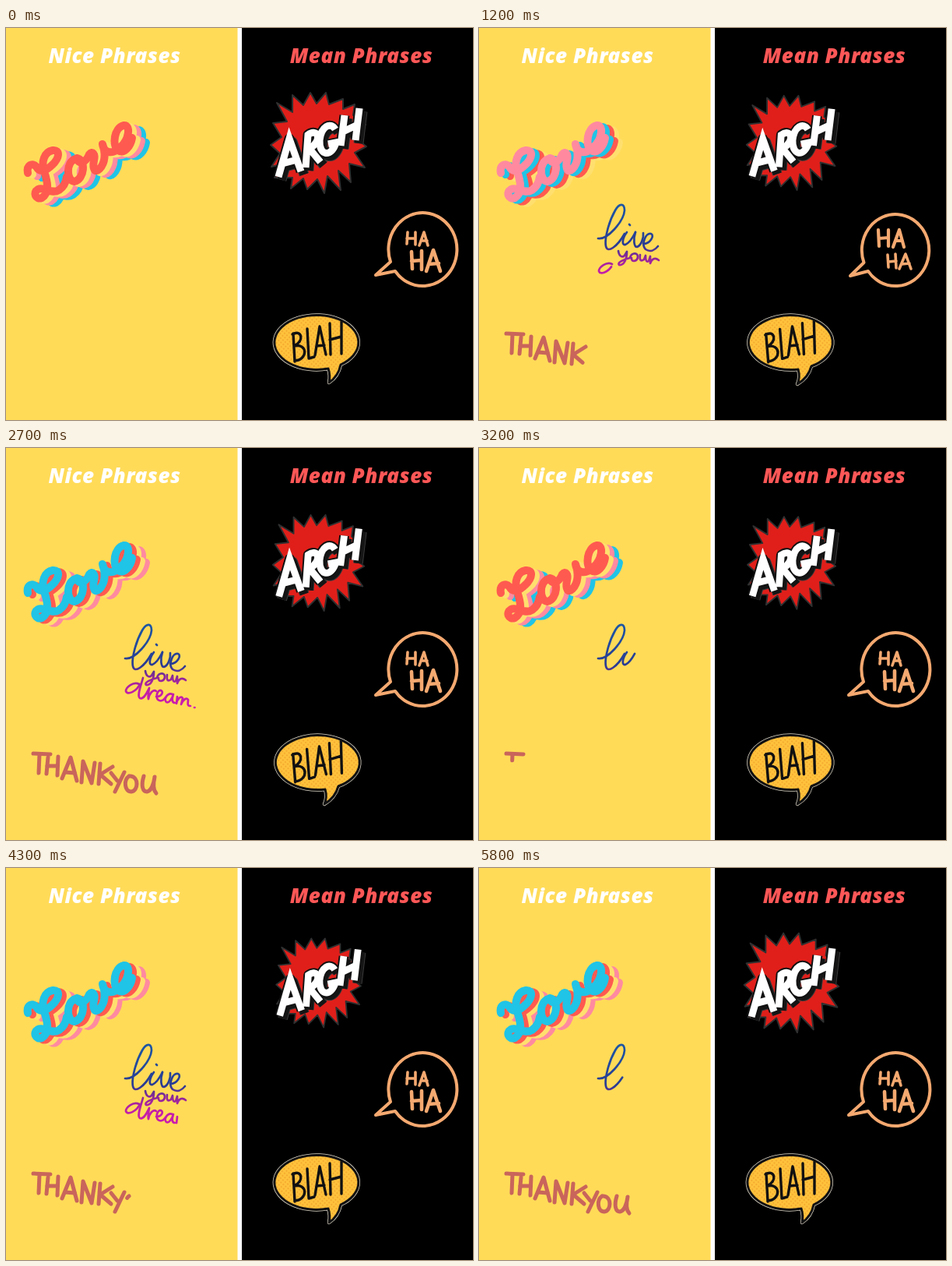
An HTML page for the animation above (5.9 s loop, 600 px wide and 503 px high).

```html
<!DOCTYPE html>
<html lang="en">
<head>
<meta charset="utf-8">
<title>Nice and mean phrases</title>
<style>
  html, body { margin: 0; height: 100%; overflow: hidden; background: #fff; }
  svg { display: block; width: 100vw; height: 100vh; }
  text { font: italic 800 26px "Open Sans", sans-serif; letter-spacing: .5px; text-anchor: middle; }
  .pen { fill: none; stroke-linecap: round; stroke-linejoin: round; }
</style>
</head>
<body>
<svg viewBox="0 0 600 503">
  <defs>
    <linearGradient id="ink" gradientUnits="userSpaceOnUse" x1="0" y1="225" x2="0" y2="334">
      <stop offset="0" stop-color="#1c57a5"/>
      <stop offset=".5" stop-color="#2a3b92"/>
      <stop offset=".63" stop-color="#8d2898"/>
      <stop offset=".78" stop-color="#c01fa6"/>
      <stop offset="1" stop-color="#cf1bb0"/>
    </linearGradient>
    <pattern id="dots" width="4" height="4" patternUnits="userSpaceOnUse" patternTransform="rotate(40)">
      <rect width="4" height="4" fill="#ffc23c"/>
      <circle cx="2" cy="2" r="1" fill="#f1a42b"/>
    </pattern>
    <g id="love">
      <path d="M28 186C26 176 34 172 39 178C44 187 53 182 59 176C69 167 70 156 60 157C49 159 45 172 49 184
        C53 196 57 211 46 218C38 221 34 211 41 207C50 203 58 214 68 208C74 204 77 198 78 191"/>
      <path d="M89 168C77 172 77 196 88 197C101 194 103 169 91 167C94 177 103 172 107 162
        C111 157 115 162 113 170C111 180 114 187 120 181C128 173 128 160 124 149
        C126 162 138 162 147 153C158 143 161 124 151 125C139 128 136 150 144 157C152 162 160 152 162 141"/>
    </g>
    <path id="argh" d="M350 191L364 142L379 184M355 174L374 169M385 179L388 137C400 128 408 143 390 155L404 172
      M423 130C417 120 405 126 403 144C402 164 418 167 424 147L414 149
      M435 112L430 151M454 103L449 144M433 133L452 124"/>
  </defs>

  <rect width="297.5" height="503" fill="#ffdb58"/>
  <rect x="303" width="297" height="503" fill="#000"/>
  <text x="139.5" y="45" fill="#fff">Nice Phrases</text>
  <text x="456.5" y="45" fill="#ff5757">Mean Phrases</text>

  <g id="layers" class="pen" stroke-width="10">
    <use href="#love" x="18" y="6"/>
    <use href="#love" x="12" y="4"/>
    <use href="#love" x="6" y="2"/>
    <use href="#love"/>
  </g>
  <g id="dream" class="pen" stroke="url(#ink)" stroke-width="2.7"></g>
  <g id="thanks" class="pen" stroke="#c9655b" stroke-width="5"></g>

  <path id="burst" fill="#e01f1a" stroke="#303030" stroke-width="2" stroke-linejoin="round" d="M348 96L368 108L368 86
    L382 99L391 83L399 97L411 83L415 98L433 91L433 104L448 98L446 112L462 124L450 142L463 152L448 160L461 179
    L441 174L443 198L427 183L430 208L413 190L409 212L400 194L387 207L382 193L366 206L368 192L345 192L357 174
    L341 178L352 161L340 150L354 140L343 122L361 120Z"/>
  <g id="shout" fill="none">
    <g stroke-linejoin="round">
      <use href="#argh" x="4" y="4" stroke="#3a3a3a" stroke-width="13"/>
      <use href="#argh" x="4" y="4" stroke="#151515" stroke-width="11"/>
      <use href="#argh" stroke="#111" stroke-width="13"/>
    </g>
    <use href="#argh" stroke="#fff" stroke-width="9"/>
  </g>

  <g class="pen" stroke="#f4a970" stroke-width="4">
    <g id="laughA">
      <path d="M500 312L475 317L494 300A44 47 0 1 1 500 312"/>
      <path stroke-width="3.6" d="M516 262L515 277M526 262L526 278M515 270H526M531 279L537 262L542 279M533 273H541"/>
      <path stroke-width="4.6" d="M521 287L522 309M534 286V310M521 299L534 298M540 312L549 285L558 312M543 303L556 302"/>
    </g>
    <g id="laughB">
      <path d="M500 312L477 318L494.5 301A43.2 46 0 1 1 500 312"/>
      <path stroke-width="4.2" d="M513 259L514 280M526 259V280M514 270L526 269M532 281L540 259L546 281M535 273H544"/>
      <path stroke-width="3.6" d="M525 291L526 307M535 290L536 308M526 300L536 299M540 309L548 290L555 309M543 303L553 302"/>
    </g>
  </g>

  <g class="pen">
    <path class="bubble" stroke="#d8d2c4" stroke-width="4.5"/>
    <path class="bubble" stroke="#111" stroke-width="3" fill="url(#dots)"/>
    <path id="blah" stroke="#111" stroke-width="3.4" d="M369 392L371 428M368 393C380 386 384 402 370 408C388 404 388 426 371 427
      M387 386L389 424L396 422M397 420L403 383L411 419M399 408L409 407M416 379L417 419M431 377V418M416 400L431 396"/>
  </g>
</svg>
<script>
const $ = id => document.getElementById(id);

// Pen strokes in writing order, each with the second it is finished.
const dreamStrokes = [
  ["M153 270C165 272 186 248 187 234C187 224 180 225 175 234C167 248 161 270 163 280C165 290 178 280 187 264", .27],
  ["M190 262C184 270 183 279 188 278C193 276 198 268 201 262", .44],
  ["M201 262C198 271 199 281 203 281C208 279 212 270 211 263", .54],
  ["M211 277C220 277 226 266 221 264C214 262 208 278 214 284C220 288 226 285 230 280", .66],
  ["M193 252l1 1", .7],
  ["M179 286C180 293 184 295 187 292L190 287C190 297 186 305 180 304C177 301 186 297 194 295C195 289 203 287 204 293C204 300 195 301 196 295", .92],
  ["M207 291C206 298 208 300 212 297L214 292C214 298 215 301 218 299L220 293L220 302C222 296 226 294 231 298", 1.1],
  ["M171 303C164 299 154 307 154 312C156 318 168 312 172 303", 1.21],
  ["M176 295C173 306 168 318 172 321C177 323 181 314 184 308C183 314 182 319 183 322C184 315 189 309 193 312", 1.36],
  ["M193 319C200 319 203 313 199 311C194 310 191 322 197 324C200 325 203 323 205 320", 1.43],
  ["M214 316C208 313 202 322 206 326C210 328 214 320 215 316C213 322 213 327 217 327", 1.5],
  ["M220 319L219 328C220 322 225 317 227 321L225 329C228 322 232 320 234 323C234 327 232 331 237 331", 1.7],
  ["M242 333h.5", 1.75]
];
const thanksStrokes = [
  ["M35 392L57 393", .076], ["M43 393L42 417", .15],
  ["M54 397L52 418", .22], ["M67 396L66 420", .29], ["M53 408L66 408", .335],
  ["M72 424L83 397L91 427", .54], ["M76 416L88 417", .585],
  ["M97 429L99 402L110 430L114 404", .85],
  ["M121 405L119 431", .93], ["M137 409L121 419L135 431", 1.08],
  ["M135 417L143 427", 1.12], ["M152 416L140 441", 1.19],
  ["M158 421C151 426 152 441 161 441C170 440 171 422 160 421", 1.35],
  ["M177 421C173 434 176 441 181 441C187 440 190 430 191 422C189 431 189 439 193 443", 1.58]
];

function makeWriter(group, strokes) {
  let start = 0;
  const pens = strokes.map(([d, end]) => {
    const path = document.createElementNS("http://www.w3.org/2000/svg", "path");
    path.setAttribute("d", d);
    group.append(path);
    const pen = { path, start, end, length: path.getTotalLength() };
    start = end;
    return pen;
  });
  return time => pens.forEach(({ path, start, end, length }) => {
    const done = Math.min(1, (time - start) / (end - start));
    path.style.visibility = done > 0 ? "visible" : "hidden";
    path.style.strokeDasharray = done < 1 ? `${Math.max(0, done) * length} ${length + 9}` : "none";
  });
}

const writeDream = makeWriter($("dream"), dreamStrokes);
const writeThanks = makeWriter($("thanks"), thanksStrokes);
const layers = [...$("layers").children].reverse();
const bubbles = document.querySelectorAll(".bubble");
const loveColors = ["#ff5a50", "#ffdf6e", "#ff8aa0", "#20c4e6"];
const bubblePaths = [
  "M414 437Q417 446 415 455Q427 447 430 432A54 35 0 1 0 414 437",
  "M410 438Q413 448 409 457Q423 449 427 434A54 35 0 1 0 410 438"
];
const mod = (a, n) => ((a % n) + n) % n;
const zoom = (el, s) => el.setAttribute("transform", `translate(402 147) scale(${s}) translate(-402 -147)`);

function draw(frame) {
  const t = frame / 10;

  const turn = Math.floor(frame / 2);
  layers.forEach((layer, i) => layer.setAttribute("stroke", loveColors[mod(i - turn, 4)]));

  writeDream(t % 2.77);
  const thanksTime = mod(t - .13, 2.97);
  writeThanks(thanksTime < 2.75 ? thanksTime : -1);

  const shrink = 1 - Math.abs(1 - 2 * mod(t / .96, 1));
  zoom($("burst"), 1 - .12 * shrink);
  zoom($("shout"), 1 - .035 * shrink);

  const laugh = Math.floor(frame / 4) % 2;
  $("laughA").style.display = laugh ? "none" : "";
  $("laughB").style.display = laugh ? "" : "none";

  const pose = t % .252 < .13 ? 0 : 1;
  bubbles.forEach(b => b.setAttribute("d", bubblePaths[pose]));
  $("blah").setAttribute("transform", pose ? "rotate(-1.5 400 402)" : "");
}

function tick() {
  draw(Math.floor(performance.now() % 5900 / 100));
  requestAnimationFrame(tick);
}
tick();
</script>
</body>
</html>
```
